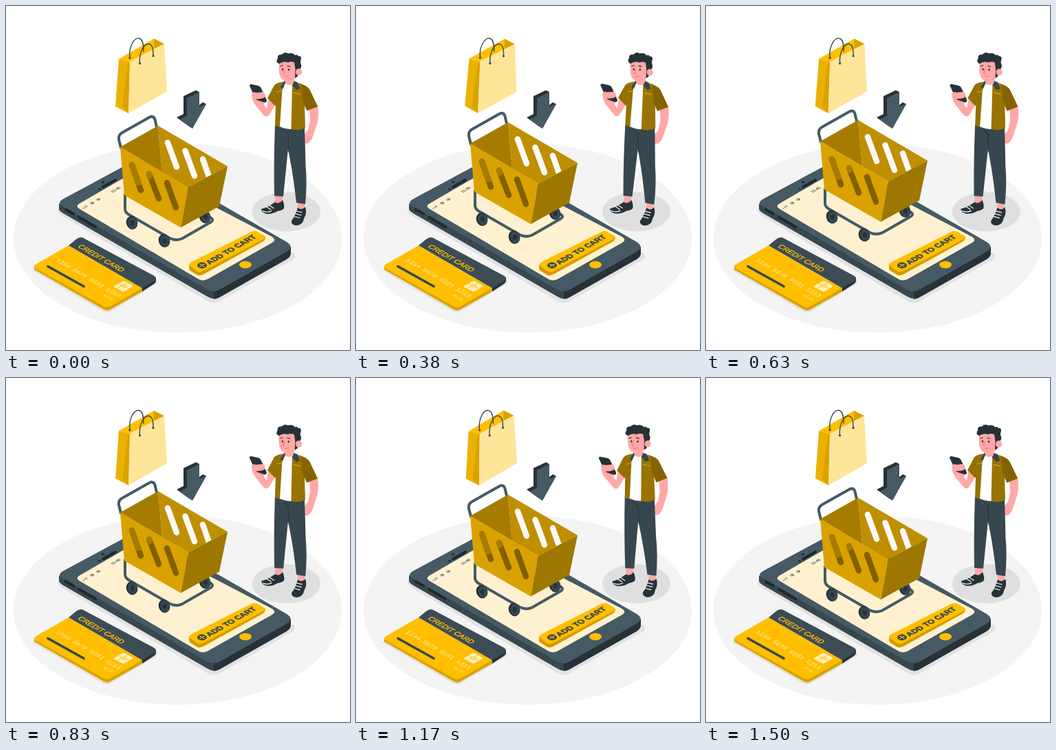
Animation of 500x500 px, one loop 1.54 s. Source, as an HTML page:

```html
<!DOCTYPE html>
<html lang="en">
<head>
<meta charset="utf-8">
<title>Add to cart</title>
<style>
  html, body { margin: 0; width: 100%; height: 100%; overflow: hidden; background: #fff; }
  svg { display: block; width: 100vw; height: 100vh; }
  text { font-family: "Liberation Sans", Arial, sans-serif; }
  .mono { font-family: "Liberation Mono", monospace; }
  .line { fill: none; stroke-linecap: round; stroke-linejoin: round; }
</style>
</head>
<body>
<svg viewBox="0 0 500 500">
  <defs>
    <g id="wheel">
      <ellipse rx="8.2" ry="9.800" fill="#263238" transform="rotate(-18)"/>
      <ellipse cx="1.2" cy=".6" rx="6.800" ry="8.600" fill="#37474f" transform="rotate(-18)"/>
      <ellipse cx=".8" cy=".2" rx="3" ry="3.8" fill="#263238"/>
    </g>
    <clipPath id="mouth"><path d="M166 205L221 174 322 233 265 263Z"/></clipPath>
    <clipPath id="wall"><path d="M166 200L210 228 214 248 197 260 170 265Z"/></clipPath>
    <g id="slots" class="line" stroke-width="8.4"><path d="M183 231L196 268M208 244L222 280M234 257L247 293"/></g>
  </defs>

  <ellipse cx="249.500" cy="337.500" rx="238.500" ry="137.500" fill="#f4f4f4"/>
  <ellipse cx="407.500" cy="299" rx="49.500" ry="28.500" fill="#dfdfdf"/>

  <g id="phone">
    <path fill="#e2e2e2" d="M74 295Q75 302 86 308L293 429Q302 434 311 429L418 368Q423 363 417 358L300 400Z"/>
    <path fill="#37474f" d="M77 287V295Q77 298 86 303L293 422.500Q302 428 311 423L408 368Q414 364 414 359V350L300 380Z"/>
    <path fill="#263238" d="M302 414V426Q307 426 311 423L408 368Q414 364 414 359V350Z"/>
    <path fill="#455a64" d="M86 293Q71 287 84 280L186 225Q194 221 203 225L408 343Q419 350 408 357L311 412Q302 417 293 412.500Z"/>
    <path fill="#fff1d0" d="M107 295Q100 291 107 287L190 239Q196 236 202 239L386 335Q394 340 387 344L293 397Q285 401 278 396Z"/>
    <g class="line" stroke="#1f2a30" stroke-width="4">
      <path d="M87 296L98 302M106 307L130 321"/>
      <path d="M141 263L159 253"/>
    </g>
    <ellipse cx="141" cy="256" rx="2.400" ry="1.600" fill="#1f2a30"/>
    <ellipse cx="136" cy="266" rx="2" ry="1.300" fill="#1f2a30"/>
    <g class="line" stroke="#37474f" stroke-width="1">
      <path d="M112 294L113 294.600M114 292.300L115.600 293.200M115.600 290.300L118 291.700"/>
      <path d="M122.500 286.500Q125 284 127.500 285.700M124 287.800Q126 286 127.500 287.300M131.500 281.500Q133.500 279 136.500 280.500M133 282.500Q134.500 281 136 282"/>
    </g>
    <text transform="matrix(.866 -.5 .866 .5 155 271.500)" font-size="5.600" font-weight="bold" fill="#37474f">11:45</text>
    <path fill="#d29c00" d="M266 376V381Q266 384 270 386L278 391Q282 393 287 390L374 342Q377 340 377 335Z"/>
    <path fill="#ffbf00" d="M269 379Q263 376 270 372L357 328Q361 326 365 328L374 333Q379 336 374 339L287 385Q282 388 277 385Z"/>
    <ellipse cx="285" cy="377" rx="7" ry="4.400" fill="#37474f"/>
    <path class="line" stroke="#ffbf00" stroke-width="1.500" d="M282 375.400L288 378.600M282 378.600L288 375.400"/>
    <text transform="matrix(.866 -.5 .866 .5 296 376)" font-size="11.600" font-weight="bold" fill="#37474f" stroke="#37474f" stroke-width=".5">ADD TO CART</text>
    <ellipse cx="348" cy="376" rx="9" ry="5.200" fill="#ffbf00"/>
  </g>

  <g id="card">
    <path fill="#e2e2e2" d="M38 384L141 444Q146 447 152 444L219 404Q223 401 218 398L100 345Z"/>
    <path fill="#d9a200" d="M41 378V383L142 441Q147 444 152 441L198 415V405Z"/>
    <path fill="#263238" d="M198 409V415L215 404Q218 402 218 399V394Z"/>
    <path fill="#ffbf00" d="M44 382Q38 378.500 44 375L91 348 198 410 152 436.500Q147 439 142 436.500Z"/>
    <path fill="#3b4c55" d="M91 348L102 339Q107 335 112 337L215 392Q221 396 215 400L198 410Z"/>
    <text transform="matrix(.866 .5 -.866 .5 103.500 350)" font-size="10.800" fill="#ffbf00" stroke="#ffbf00" stroke-width=".4">CREDIT CARD</text>
    <text class="mono" transform="matrix(.866 .5 -.866 .5 71 370)" font-size="9" letter-spacing=".25" fill="#fff0c4">1234 5678 9191 1213</text>
    <text class="mono" transform="matrix(.866 .5 -.866 .5 141 421)" font-size="5" fill="#fff0c4">01/25</text>
    <path class="line" stroke="#37474f" stroke-width="3.600" d="M61 378.500L113 407.500"/>
    <path fill="#fff0c4" d="M158 409Q156 407.700 158 406.500L169 400.300Q171 399 173 400.300L183.500 406Q185 407 183.500 408.200L173 414.300Q171 415.500 169 414.500Z"/>
    <path class="line" stroke="#ffbf00" stroke-width=".8" d="M163 403.500L179 411M161 410.500L178 402.500M167 407L172 405 176 407 171 409.500Z"/>
  </g>

  <g id="arrow">
    <path fill="#263238" d="M258 131L276 122.500 281 125 281 144 286 140 291 142.500 271 178 266 175 248 162 258 157Z"/>
    <path fill="#455a64" d="M263 134L281 125V146.500L291 142 271 178 252.500 165 263 159.500Z"/>
  </g>

  <g id="cart">
    <g class="line" stroke="#455a64" stroke-width="4">
      <path d="M173 274V295Q173 300 179 303.500L238 337.500Q247 342 256 338L297 314.500Q303 311 297 307.500L283 299"/>
      <path d="M167 206L164 194Q163 187 169 184L208 162Q214.500 158.500 216.500 165L219 176"/>
    </g>
    <use href="#wheel" x="289" y="306"/>
    <use href="#wheel" x="183" y="315"/>
    <use href="#wheel" x="230" y="341"/>
    <path fill="#bf8f00" d="M221 174L322 233 265 263 227 241Z"/>
    <path fill="#a67c00" d="M166 205L221 174 227 241Z"/>
    <g clip-path="url(#mouth)">
      <path class="line" stroke="#fafafa" stroke-width="8.400" d="M235 198.500L248 234M260.500 210.500L274 247M286 222.500L299 259"/>
    </g>
    <path fill="#d9a200" d="M166 205L265 263 254 322 172 275Z"/>
    <path fill="#9d7700" d="M265 263L322 233 310 291 254 322Z"/>
    <use href="#slots" stroke="#806000"/>
    <g clip-path="url(#wall)"><use href="#slots" stroke="#a67c00"/></g>
  </g>

  <g id="bag">
    <path fill="#ffbf00" d="M164 77L215 47.500 230 55 180 81Z"/>
    <path fill="#d9a200" d="M215 47.500L230 55 215 62Z"/>
    <path class="line" stroke="#37474f" stroke-width="1.400" d="M180 75C178 58 187 46 193 47 199 48 200 56 200 66"/>
    <path fill="#ecb100" d="M164 77L180 81 178 156 159 146Z"/>
    <path fill="#d9a200" d="M177 84L180 81 178 156 169 146Z"/>
    <path fill="#ffe599" d="M180 81L230 55 234 124 178 156Z"/>
    <path class="line" stroke="#37474f" stroke-width="1.400" d="M194.500 83C193 67 201 55 207 55 213 56 214 62 214 72"/>
    <g fill="#37474f"><circle cx="180" cy="75.500" r="1.600"/><circle cx="194.500" cy="83.500" r="1.600"/><circle cx="214" cy="72.500" r="1.600"/></g>
  </g>

  <g id="man">
    <g fill="#ffa8a7">
      <path d="M391 274H402L401 289 391 290Z"/>
      <path d="M424 284H434.500L433 298 424 298Z"/>
      <path d="M441 149L453 145Q455 156 453 168L446 190Q442 200 436 200 431 199 432 193 430 189 434 186L439 180 442 166Z"/>
    </g>
    <g fill="#263238">
      <path d="M391 285Q396 289 402 282 405 289 404 294 402 297 395 298 387 303 378 302 371 300 371 295 380 293 391 285Z"/>
      <path d="M424 293Q430 298 435 292 438 301 433 309 432 318 422 319 414 318 415 312 420 306 424 293Z"/>
    </g>
    <g class="line" stroke="#fff" stroke-width="1.200">
      <path d="M383 290L389 294M379 292L385 296M373 298Q379 301 386 298"/>
      <path d="M422 298L430 300M421 302L429 304M419 306L427 308"/>
    </g>
    <path fill="#37474f" d="M391 172L434 176Q435 210 435.500 232 438 258 435 288L422 286Q418 250 413 224L410 208 403 277 390 276Q389 225 391 172Z"/>
    <path class="line" stroke="#263238" stroke-width="1" d="M411 212L410 186 404 181"/>
    <path fill="#fff" d="M402 113L418 113 415 179Q406 179 397 175Z"/>
    <path fill="#ffa8a7" d="M405 105L420 100 419 111Q413 118 405 112Z"/>
    <path fill="#ffa8a7" d="M381 136L392 143 382 159Q378 163 373 157L361 142Q356 133 358 127L368 130 376 136 375 144 379 149Z"/>
    <path fill="#263238" d="M354 116Q354 113 358 114L367 116Q370 117 371 120L379 137Q379 141 375 140L366 137Q363 136 362 133Z"/>
    <path fill="#ffa8a7" d="M357 128Q358 124 364 126L374 125Q378 128 376 133 370 136 362 135 358 133 357 128Z"/>
    <path fill="#947000" d="M404 110Q394 111 390 115L380 134 391 145 392 144 391 174 398 176 402 114Z"/>
    <path fill="#997300" d="M416 114L426 112Q436 115 441 121L453 146 438 152 434 143 435 177Q426 182 414.500 179Z"/>
    <path fill="#846300" d="M429 114Q439 116 442 123L453 146 437 152 431 137Z"/>
    <path class="line" stroke="#e6b000" stroke-width="1" d="M394 125L400 124M418 126L428 128"/>
    <path fill="#37474f" d="M405 108L399 118 402 121 406 112ZM419 109L424 111 427 120 422 122 416 115Z"/>
    <path fill="#ffa8a7" d="M397 82Q395 101 402 107 410 110 417 107 422 103 424 96V80Z"/>
    <path fill="#263238" d="M397 84Q391 81 395 76 394 70 401 70.500 405 66 410 69 417 67 420 71.500 424 70 425 73 429 72 429 77 427 82 429 85 430 89 427 92L424 99 424 102 420 105 420.500 92 419 82Q414 80 410 82 402 80 397 84Z"/>
    <ellipse cx="425.500" cy="96" rx="4.600" ry="5" fill="#ffa8a7"/>
    <g fill="#263238"><ellipse cx="402" cy="92" rx="1.200" ry="1.600"/><ellipse cx="411" cy="92.500" rx="1.200" ry="1.600"/></g>
    <path class="line" stroke="#263238" stroke-width="1.200" d="M399 87.500L402 86.500M409 87L413 88"/>
    <path class="line" stroke="#e5787a" stroke-width="1" d="M405 92L403 98 405 98.500M405 102.500Q409 103 411 101"/>
  </g>
</svg>
<script>
  const LOOP = 1540, STEPS = 37;
  const $ = id => document.getElementById(id);
  const cart = $("cart"), bag = $("bag"), man = $("man");

  // 0 → 1 → -1 → 0 degrees at 0, 25, 75 and 100 %
  const sway = p => p < .25 ? p * 4 : p < .75 ? 2 - p * 4 : p * 4 - 4;
  const lift = p => -10 * (1 - Math.abs(1 - 2 * p));

  const start = performance.now();
  function draw(now) {
    const t = Math.max(0, now - start) % LOOP;
    const p = Math.floor(t * STEPS / LOOP) / (STEPS - 1);
    const a = sway(p);
    cart.setAttribute("transform", `translate(0 ${lift(p)})`);
    bag.setAttribute("transform", `rotate(${a} 197 101)`);
    man.setAttribute("transform", `rotate(${a} 404 193)`);
    requestAnimationFrame(draw);
  }
  draw(start);
</script>
</body>
</html>
```
